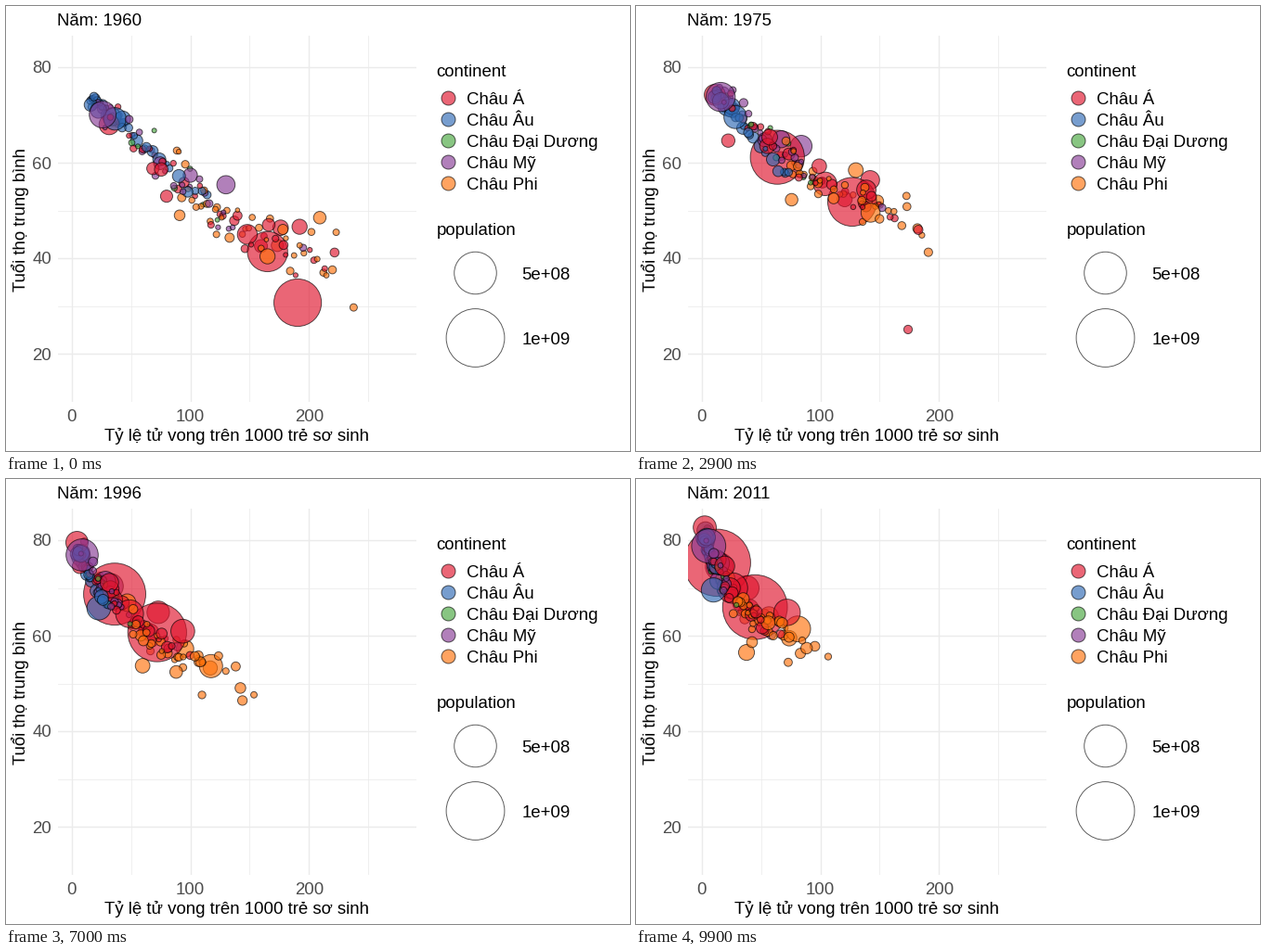
A matplotlib script for the animation above (10000 ms loop, 672 by 480 pixels).

```python
import numpy as np
import matplotlib.pyplot as plt
from matplotlib.animation import FuncAnimation

W, H, DPI = 672, 480, 100
PT = 72 / DPI
FRAMES, INTERVAL = 100, 100
FIRST, LAST = 1960, 2011
FONT_PX = 18.67
ALPHA = 0.65

ASIA, EUROPE, OCEANIA, AMERICA, AFRICA = range(5)
NAMES = ["Châu Á", "Châu Âu", "Châu Đại Dương", "Châu Mỹ", "Châu Phi"]
FILLS = ["#e0142d", "#2f69b4", "#48a73f", "#883c96", "#ff720c"]

t = np.linspace(0, 1, FRAMES)
year = FIRST + (LAST - FIRST) * t
rng = np.random.default_rng(7)
plt.rcParams["font.family"] = ["Liberation Sans", "DejaVu Sans"]


def radius(pop):
    """Bubble radius in pixels for a population in millions."""
    return 1.9 + 29.5 * np.sqrt(pop / 1000)


def bell(u, center, width):
    return np.exp(-((u - center) / width) ** 2)


def drift(group, pops, start, end, pace=1.3, stall=None, shock=None):
    """Mortality decays geometrically while life expectancy climbs.

    stall: share of progress lost in the late nineties (African default).
    shock: (year, width, lost years of life, added mortality).
    """
    if stall is None:
        stall = 0.2 if group == AFRICA else 0
    slump = bell(t, 0.77, 0.16)
    climb = 1.3 if group == EUROPE else 0.7
    (x0, y0), (x1, y1) = start, end
    x = x0 * (x1 / x0) ** (t ** pace - min(stall, 0.2) * slump)
    y = y0 + (y1 - y0) * (t ** climb - stall * slump)
    if shock:
        when, width, lost, added = shock
        hit = bell(year, when, width)
        x, y = x + added * hit, y - lost * hit
    return group, x, y, radius(pops[0] + (pops[1] - pops[0]) * t)


def path(group, pops, *points):
    """Straight moves between (year, mortality, life) points."""
    when, xs, ys = zip(*points)
    x = np.interp(year, when, xs, left=np.nan)
    y = np.interp(year, when, ys, left=np.nan)
    return group, x, y, radius(pops[0] + (pops[1] - pops[0]) * t)


# The largest and the most unusual countries, in stacking order.
leaders = [
    drift(ASIA, (48, 150), (176, 46.4), (38, 70), pace=1.6),
    drift(AMERICA, (72, 197), (130, 55.4), (15, 74.5)),
    drift(ASIA, (6, 14), (146, 42), (36, 66), shock=(1977.5, 4.8, 36, 85)),
    path(ASIA, (645, 1350), (1960, 190.4, 30.7), (1966.2, 82.5, 55.5),
         (1975, 63.7, 61.2), (1996, 36.4, 68.7), (2011, 13, 75.3)),
    drift(AFRICA, (27, 80), (209, 48.5), (20, 72), stall=0),
    drift(EUROPE, (73, 82), (34, 69.6), (3.5, 80.5)),
    drift(AMERICA, (4, 10), (195, 42.2), (57, 62), shock=(2010, 0.6, 29, 27)),
    drift(ASIA, (450, 1250), (165, 41.4), (45, 66)),
    drift(ASIA, (89, 242), (148, 45), (26, 70)),
    drift(EUROPE, (50, 60), (43, 69.2), (3.3, 82.1)),
    drift(ASIA, (93, 127), (31.7, 68), (2.7, 82.7), pace=0.7),
    drift(AFRICA, (5, 15), (237.5, 29.7), (81, 57)),
    drift(AMERICA, (38, 119), (100, 57.4), (14, 75.2)),
    drift(AFRICA, (45, 164), (165, 40.4), (79.5, 62)),
    drift(ASIA, (45, 176), (192, 46.6), (72, 64.9), pace=0.9),
    drift(ASIA, (26, 94), (68.5, 58.8), (24, 70)),
    path(EUROPE, (120, 143), (1960, 36.5, 69.2), (1988, 21.5, 69.9),
         (1996, 23, 65.8), (2001, 19, 65.2), (2011, 10, 69.6)),
    drift(AFRICA, (3, 11), (122, 45), (42, 65), shock=(1994, 1.1, 43, 40)),
    drift(AFRICA, (17, 51), (91, 49), (37, 56.7)),
    drift(ASIA, (25, 49), (80, 53), (3.3, 80.5), pace=0.75),
    drift(ASIA, (28, 73), (166, 47), (13, 76)),
    drift(EUROPE, (52, 63), (22.6, 71), (4.3, 80.7)),
    drift(AMERICA, (180, 312), (26.2, 70.1), (6, 78.8), pace=0.9),
    drift(ASIA, (33, 90), (75.5, 58.6), (19.5, 74.6)),
    path(ASIA, (5.3, 24), (1963, 276.9, 36.5), (1966.2, 256, 38.2),
         (1975, 182, 46), (1988, 92, 58), (2011, 46, 65)),
]


def life_first(x):
    return 34 + 41 * np.exp(-(x / 130) ** 1.5)


def life_last(x):
    return 52 + 31 * np.exp(-(x / 50) ** 0.8)


def crowd(group, n, span, skew, keep, spread, pop, growth):
    """n smaller countries scattered along the global trend."""
    for i in range(n):
        x0 = span[0] + (span[1] - span[0]) * ((i + rng.random()) / n) ** skew
        x1 = max(2.3, x0 * rng.uniform(*keep))
        y0 = life_first(x0) + rng.normal(0, spread)
        y1 = life_last(x1) + rng.normal(0, spread * 0.8)
        p = min(30, pop * np.exp(rng.normal(0, 1.05)))
        stall = rng.uniform(0, 0.45) if group == AFRICA else 0
        yield drift(group, (p, p * growth), (x0, y0), (x1, y1), stall=stall)


small = [
    *crowd(ASIA, 30, (30, 222), 1.1, (0.1, 0.33), 2.2, 3.5, 2.6),
    *crowd(EUROPE, 32, (16, 118), 2.1, (0.09, 0.15), 0.8, 6, 1.2),
    *crowd(OCEANIA, 9, (20, 135), 1.1, (0.2, 0.42), 2.5, 0.5, 2),
    *crowd(AMERICA, 25, (20, 140), 1.1, (0.12, 0.25), 2.2, 2, 2.2),
    *crowd(AFRICA, 38, (88, 225), 1.2, (0.24, 0.5), 2.8, 3.2, 3.2),
]

order = np.argsort(np.r_[np.linspace(0, 1, len(leaders)), rng.random(len(small))])
countries = leaders + small
countries = [countries[i] for i in order]
groups, xs, ys, rs = (np.array(part) for part in zip(*countries))

fig = plt.figure(figsize=(W / DPI, H / DPI), dpi=DPI, facecolor="white")

page = fig.add_axes([0, 0, 1, 1])
page.set(xlim=(0, W), ylim=(H, 0))
page.axis("off")

# Pixel position of the panel, of (0, 80) and the scale of both axes.
LEFT, RIGHT, TOP, BOTTOM = 56, 442, 32, 426.5
X0, Y80, SX, SY = 70.6, 66.1, 1.279, 5.15
panel = fig.add_axes([LEFT / W, 1 - BOTTOM / H, (RIGHT - LEFT) / W, (BOTTOM - TOP) / H])
panel.set(xlim=((LEFT - X0) / SX, (RIGHT - X0) / SX),
          ylim=(80 - (BOTTOM - Y80) / SY, 80 + (Y80 - TOP) / SY))
panel.axis("off")


def write(x, y, text, color="black", **kw):
    return page.text(x, y, text, color=color, fontsize=FONT_PX * PT,
                     va="baseline", **kw)


def dots(ax, x, y, r, fill):
    return ax.scatter(x, y, s=(2 * PT * np.asarray(r)) ** 2, c=fill, alpha=ALPHA,
                      edgecolors="black", linewidths=0.95 * PT, zorder=3)


def grid(xticks, yticks, px):
    for x in xticks:
        panel.axvline(x, color="#ebebeb", lw=px * PT, zorder=1)
    for y in yticks:
        panel.axhline(y, color="#ebebeb", lw=px * PT, zorder=1)


grid(range(50, 251, 100), range(30, 71, 20), 0.75)
grid(range(0, 201, 100), range(20, 81, 20), 1.45)

for v in range(0, 201, 100):
    write(X0 + SX * v, 448, str(v), "#4d4d4d", ha="center")
for v in range(20, 81, 20):
    write(49, 72.5 + SY * (80 - v), str(v), "#4d4d4d", ha="right")
write(249, 469, "Tỷ lệ tử vong trên 1000 trẻ sơ sinh", ha="center")
write(21, 230, "Tuổi thọ trung bình", ha="center", rotation=90,
      rotation_mode="anchor")
title = write(55, 21, "")

write(463.5, 76, "continent")
for i, (name, fill) in enumerate(zip(NAMES, FILLS)):
    y = 99 + 23.05 * i
    dots(page, [475.9], [y], [7.5], fill)
    write(496.5, y + 6.7, name)

write(463.5, 247, "population")
for y, pop, label in ((288, 500, "5e+08"), (358, 1000, "1e+09")):
    ring = dots(page, [505.5], [y], [radius(pop)], "white")
    ring.set_facecolor("none")
    write(555.5, y + 7, label)

cloud = dots(panel, np.zeros(len(groups)), np.zeros(len(groups)),
             np.ones(len(groups)), [FILLS[g] for g in groups])


def draw(frame):
    spots = np.column_stack([xs[:, frame], ys[:, frame]])
    cloud.set_offsets(np.ma.masked_invalid(spots))
    cloud.set_sizes((2 * PT * rs[:, frame]) ** 2)
    title.set_text(f"Năm: {round(year[frame])}")
    return cloud, title


anim = FuncAnimation(fig, draw, frames=FRAMES, interval=INTERVAL,
                     init_func=lambda: draw(0), repeat=True, repeat_delay=0)
plt.show()
```
